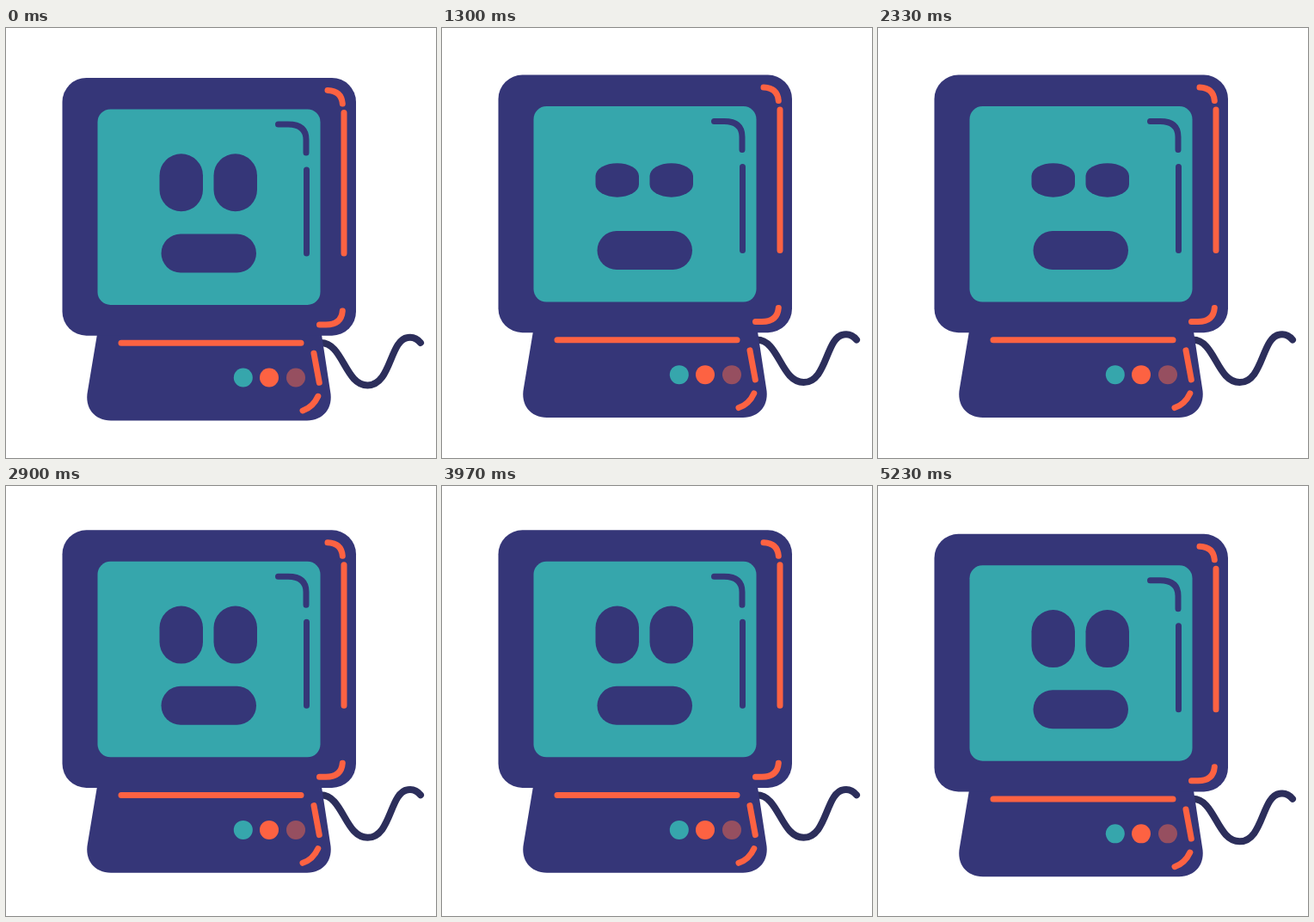
Recreate the animation shown at these times as an HTML page. Size 500x500 px, loop 5.26 s.

```html
<!DOCTYPE html>
<html lang="en">
<head>
<meta charset="utf-8">
<title>Blinking computer</title>
<style>
  html, body { margin: 0; width: 100%; height: 100%; overflow: hidden; background: #fff; }
  svg { display: block; width: 100vw; height: 100vh; }
  .line { fill: none; stroke-width: 7; stroke-linecap: round; stroke-linejoin: round; }
  .cable { stroke: #2c2e5b; stroke-width: 8; }
  .navy { fill: #353678; }
  .teal { fill: #36a6ac; }
  .orange { stroke: #fd6242; }
  .inner { stroke: #353678; }
</style>
</head>
<body>
<svg viewBox="0 0 500 500">
  <g id="computer">
    <path class="line cable" d="M366 366C392 366 394 415.5 420.5 415.5C448 415.5 446 363 467 360Q476 358.5 482 366"/>
    <path class="navy" d="M107 350L95 422C91 442 103 456.4 122 456.4H350C369 456.4 381 442 377 422L366 350Z"/>
    <rect class="navy" x="65.5" y="58" width="341.5" height="299.7" rx="28"/>
    <rect class="teal" x="106.5" y="94.5" width="259" height="227.5" rx="15"/>

    <g id="eyes" class="navy">
      <rect x="-57" y="-35" width="50.5" height="67" rx="25.25"/>
      <rect x="6" y="-35" width="50.5" height="67" rx="25.25"/>
    </g>
    <rect class="navy" x="180.5" y="239.5" width="110.5" height="45" rx="22.5"/>

    <path class="line inner" d="M316.5 112H328Q349 112 349 130V145M349.5 165V262"/>
    <path class="line orange" d="M374 72.5Q390 73 391.3 88M393 98.5V262
      M364.5 345H372Q390 345 391.3 329M134 366.3H343M358 378.3L364.3 412.3M345 445Q357 441 362.8 428.3"/>

    <circle class="teal" cx="275.8" cy="406.6" r="11"/>
    <circle fill="#fd6242" cx="306" cy="406.6" r="11"/>
    <circle fill="#964f60" cx="337" cy="406.6" r="11"/>
  </g>
</svg>
<script>
  const LOOP = 5260;
  const STEP = 70.7;
  const STEPS_PER_BOB = 15;
  const BOB = 5.65;
  const PAUSE_START = 4200;
  const PAUSE = 70;
  const computer = document.getElementById('computer');
  const eyes = document.getElementById('eyes');

  const clamp = (value, low, high) => Math.min(high, Math.max(low, value));

  // Even steps, with one short pause late in the loop
  function stepAt(time) {
    const played = time - clamp(time - PAUSE_START, 0, PAUSE);
    return Math.floor(played / STEP + 0.1);
  }

  function draw(time) {
    const phase = stepAt(time) % STEPS_PER_BOB;
    const angle = 2 * Math.PI * (phase - 0.2) / STEPS_PER_BOB;
    const lift = BOB * (1 - Math.cos(angle));
    const open = clamp(0.18 + 0.41 * Math.abs(phase - 2), 0, 1);
    computer.setAttribute('transform', `translate(0 ${-lift})`);
    eyes.setAttribute('transform', `translate(235.5 181.3) scale(1 ${open})`);
  }

  const start = performance.now();
  function tick() {
    draw((performance.now() - start) % LOOP);
    requestAnimationFrame(tick);
  }
  tick();
</script>
</body>
</html>
```
